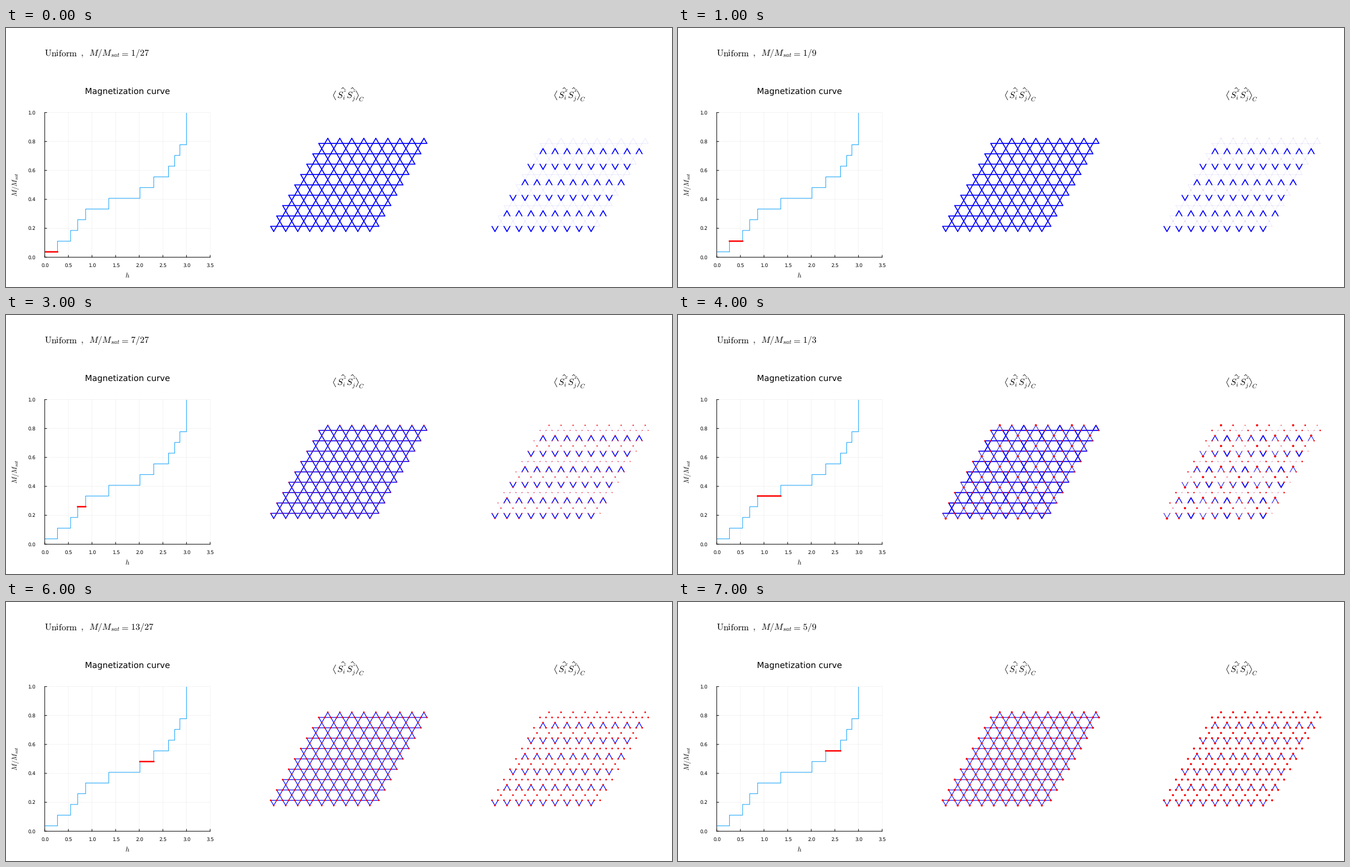
Write a matplotlib script that moves like this. It is 1198x467 px and loops after 8 s.

```python
import matplotlib.pyplot as plt
import numpy as np
from matplotlib.animation import FuncAnimation
from matplotlib.collections import LineCollection
from matplotlib.patches import Rectangle

plt.rcParams["font.family"] = "DejaVu Sans"
plt.rcParams["mathtext.fontset"] = "cm"
plt.rcParams["text.hinting"] = "none"
plt.rcParams["path.snap"] = False

W, H = 1198, 467
DPI = 72  # one point equals one pixel
BLUE, RED, CURVE = "#0000ff", "#ff0000", "#009afa"

fig = plt.figure(figsize=(W / DPI, H / DPI), dpi=DPI, facecolor="white")
ax = fig.add_axes([0, 0, 1, 1])
ax.set_xlim(0, W)
ax.set_ylim(H, 0)
ax.axis("off")


def text(x, y, s, size, **kw):
    kw.setdefault("va", "baseline")
    return ax.text(x, y, s, fontsize=size, color="black", **kw)


def line(xs, ys, color="black", lw=1.0, **kw):
    return ax.plot(xs, ys, color=color, lw=lw, **kw)[0]


# Magnetization curve
LEFT, RIGHT, TOP, BOTTOM = 69.7, 367.2, 152.5, 413.3


def px(h):
    return LEFT + 85 * np.asarray(h)


def py(m):
    return BOTTOM - (BOTTOM - TOP) * np.asarray(m)


edges = [0, 0.27, 0.547, 0.697, 0.865, 1.355, 2.015, 2.307, 2.62,
         2.75, 2.86, 3.0, 3.5]
levels = [n / 27 for n in range(1, 22, 2)] + [1]


def draw_plot():
    for h in np.arange(0, 3.6, 0.5):
        x = px(h)
        line([x, x], [TOP, BOTTOM], lw=0.6, alpha=0.08)
        line([x, x], [BOTTOM, BOTTOM - 3.5])
        text(x + 0.3, 431, f"{h:.1f}", 8.7, ha="center")
    for m in np.arange(0, 1.1, 0.2):
        y = py(m)
        line([LEFT, RIGHT], [y, y], lw=0.6, alpha=0.08)
        line([LEFT, LEFT + 3.5], [y, y])
        text(53, y + 3.2, f"{m:.1f}", 8.7, ha="right")
    line([LEFT, LEFT], [TOP, BOTTOM])
    line([LEFT, RIGHT], [BOTTOM, BOTTOM])

    steps = line(np.repeat(px(edges), 2)[1:-1], np.repeat(py(levels), 2),
                 CURVE, 0.95)
    mark = line([], [], RED, 2.6, solid_capstyle="projecting", zorder=3)
    area = Rectangle((LEFT, TOP), RIGHT - LEFT, BOTTOM - TOP,
                     transform=ax.transData)
    for artist in (steps, mark):
        artist.set_clip_path(area)

    text(218.8, 118.5, "Magnetization curve", 15, ha="center")
    text(218, 450, "$h$", 12.4, ha="center")
    text(20.8, 304.5, "$M/M_{sat}$", 12.4, rotation=90,
         rotation_mode="anchor")
    return mark


# Kagome lattice
SIDE, HEIGHT = 10.81, 9.34
X0, Y0 = 562.6, 208.15
ROWS = CELLS = 9
PANEL_SHIFT = 398


def base(r, m):
    """Site m on horizontal chain r: position, kind, three-cell class."""
    k = (m - 1) // 2
    kind = "left" if m % 2 else "right"
    return X0 + (m - r) * SIDE, Y0 + 2 * r * HEIGHT, kind, (k + r) % 3


def tip(r, k):
    """Site between chains r - 1 and r."""
    x = X0 + (2 * k + 1.5 - r) * SIDE
    return x, Y0 + (2 * r - 1) * HEIGHT, "tip", (k + r) % 3


def build():
    sites = [base(r, m) for r in range(ROWS) for m in range(2 * CELLS + 1)]
    sites += [tip(r, k) for r in range(ROWS + 1) for k in range(CELLS)]
    bonds, strong = [], []
    for r in range(ROWS):
        for k in range(CELLS):
            up = base(r, 2 * k + 1), base(r, 2 * k + 2), tip(r, k)
            down = base(r, 2 * k), base(r, 2 * k + 1), tip(r + 1, k)
            for (a, b, c), row in ((up, 1), (down, 2)):
                bonds += [(a, b), (a, c), (b, c)]
                strong += [False, r % 3 == row, r % 3 == row]
    return sites, bonds, np.array(strong)


sites, bonds, strong = build()
points = np.array([s[:2] for s in sites])
tips = np.array([s[2] == "tip" for s in sites])

THIRD = 4  # step with the three-cell order
BOND = [1.75, 1.75, 1.7, 1.6, 1.85, 1.4, 1.25, 1.1]
TIP_R = [0, 0.4, 0.9, 1.1, 0, 1.3, 1.5, 1.85]
BASE_R = [0, 0.2, 0.55, 0.8, 0, 1.3, 1.5, 1.85]
ORDER_R = {"tip": (2.0, 1.45, 0.8), "left": (0.6, 1.25, 0.6),
           "right": (1.2, 0.6, 1.35)}
ORDER_LEG = (1.0, 1.4, 1.85)


def bond_widths(i):
    if i == THIRD:
        return np.array([ORDER_LEG[b[3]] if b[2] == "tip" else BOND[i]
                         for _, b in bonds])
    return np.full(len(bonds), BOND[i])


def dot_sizes(i):
    if i == THIRD:
        radius = np.array([ORDER_R[s[2]][s[3]] for s in sites])
    else:
        radius = np.where(tips, TIP_R[i], BASE_R[i])
    return (2 * radius) ** 2


def draw_panel(shift, axis):
    offset = np.array([shift, 0])
    segments = [np.array([a[:2], b[:2]]) + offset for a, b in bonds]
    lines = LineCollection(segments, colors=BLUE, capstyle="round", zorder=2)
    ax.add_collection(lines)
    dots = ax.scatter(*(points + offset).T, c=RED, linewidths=0, zorder=3)

    # Heading: angle brackets around two operators with hats
    for x, tilt in ((588.8, 4.2), (634, -4.2)):
        x += shift
        line([x + tilt, x, x + tilt], [113.3, 121.5, 129.7], lw=0.8)
    for x, index in ((595.2, "i"), (612.3, "j")):
        x += shift
        text(x, 125.3, "$S$", 16)
        text(x + 10.3, 115.3, f"${axis}$", 10)
        text(x + 9.7, 129.3, f"${index}$", 11)
        line([x + 8.6, x + 10.9, x + 13.2], [109.5, 107.4, 109.5], lw=0.8)
    text(shift + 634.3, 132, "$C$", 11)
    return lines, dots


text(68.7, 50.3, r"$\mathrm{Uniform}$", 16)
text(134.3, 50.3, r"$\mathrm{,}$", 16)
text(148.7, 50.3, "$M/M_{sat}$", 16)
text(205, 50.3, "$=$", 16)
value = text(223.6, 50.3, "", 16)
mark = draw_plot()
z_lines, z_dots = draw_panel(0, "z")
x_lines, x_dots = draw_panel(PANEL_SHIFT, "x")


def update(i):
    n = 2 * i + 1
    g = int(np.gcd(n, 27))
    value.set_text(f"${n // g}/{27 // g}$")
    mark.set_data(px(edges[i:i + 2]), py([levels[i]] * 2))
    widths = bond_widths(i)
    z_lines.set_linewidths(widths)
    x_lines.set_linewidths(np.where(strong, widths, 0.08 - 0.006 * i))
    for dots in (z_dots, x_dots):
        dots.set_sizes(dot_sizes(i))
    return value, mark, z_lines, x_lines, z_dots, x_dots


anim = FuncAnimation(fig, update, frames=8, interval=1000, repeat=True,
                     repeat_delay=0, blit=False)
plt.show()
```
